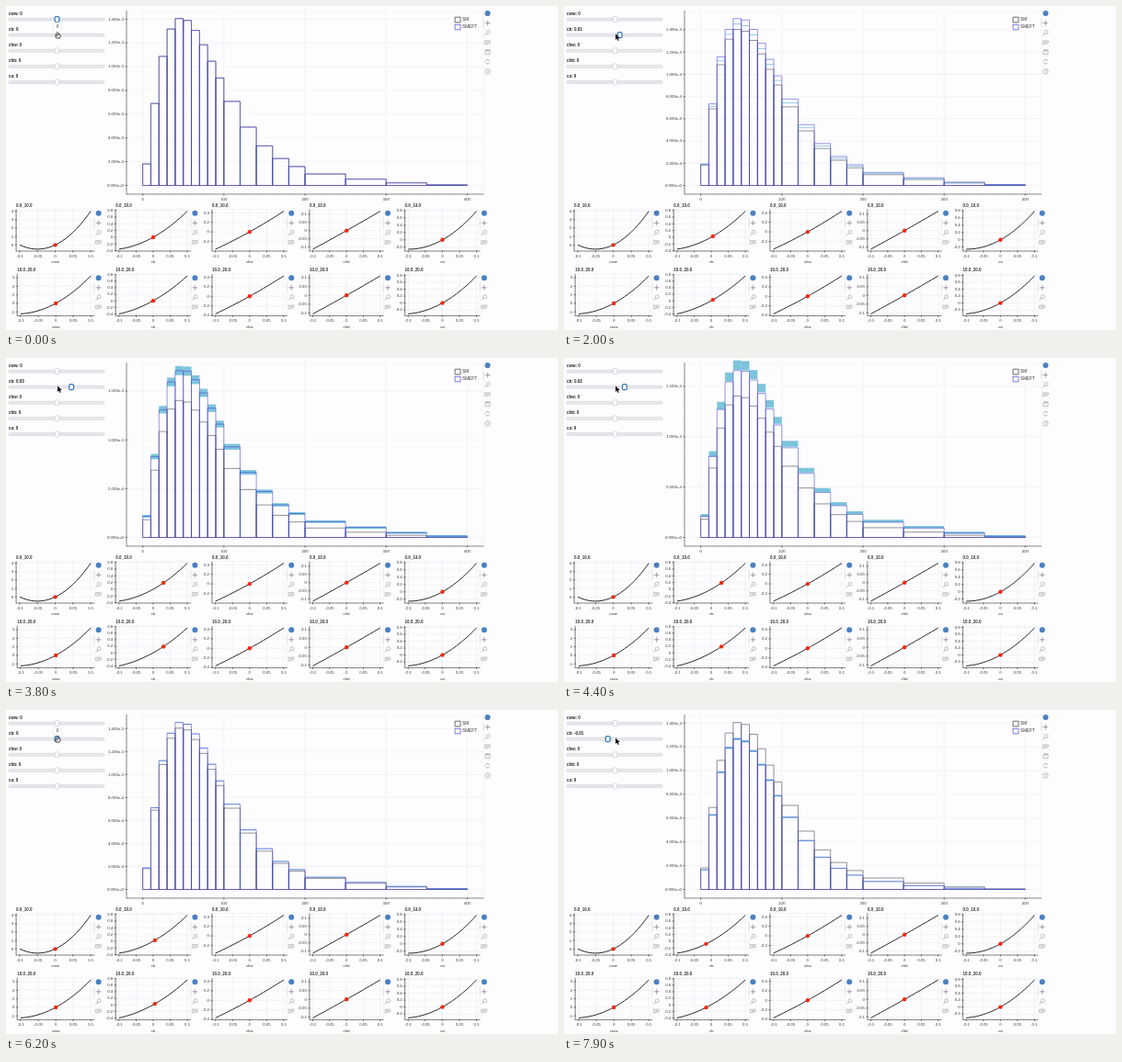
These frames come from a looping animation (600 by 353 pixels, 8000 ms). An HTML page with a canvas:

```html
<!DOCTYPE html>
<html>
<head>
<meta charset="utf-8">
<style>
html, body { margin: 0; width: 100%; height: 100%; overflow: hidden; background: #fdfcfe; }
canvas { display: block; width: 600px; height: 353px; }
</style>
</head>
<body>
<canvas id="stage"></canvas>
<script>
const stage = document.getElementById('stage');
const dpr = window.devicePixelRatio || 1;
stage.width = 600 * dpr;
stage.height = 353 * dpr;
const g = stage.getContext('2d');

const LOOP = 8000, BG = '#fdfcfe', GRID = '#ebeaf0', INK = '#333', BLUE = '#3f3fd0', ICON = '#a2a2a8';
const NAMES = ['cww', 'cb', 'chw', 'chb', 'ca'];

// the drag as [time, value] corners; the slider snaps to steps of 0.005
const DRAG = [[0, 0], [1000, 0], [1755, .0075], [2567, .02], [3600, .03], [4100, .03],
  [4500, .0175], [4850, .0125], [6150, .0025], [6550, 0], [7600, -.015], [LOOP, -.015]];

function valueAt(t) {
  if (t <= 0) return 0;
  const i = DRAG.findIndex(([at]) => at >= t);
  const [t0, v0] = DRAG[i - 1], [t1, v1] = DRAG[i];
  return Math.round((v0 + (v1 - v0) * (t - t0) / (t1 - t0)) / .005) * .005;
}

// bins widen from 10 to 20 to 50
const EDGES = [0];
while (EDGES.at(-1) < 400) {
  const x = EDGES.at(-1);
  EDGES.push(x + (x < 100 ? 10 : x < 200 ? 20 : 50));
}
const BINS = EDGES.slice(1).map((right, i) => ({ left: EDGES[i], right, x: (EDGES[i] + right) / 2 }));

// heights in 1e-3: a gamma-like peak with a small tail, and its growth with cb
const standard = x => 1.408 * ((x / 48) ** 1.5 * Math.exp((48 - x) / 32)
  + .03 * Math.exp(-(((x - 245) / 85) ** 2)));
const shifted = (x, c) => standard(x) * (1 + (.2 + .95e-5 * x * x) * (31 * c + 75 * c * c));

// linear and quadratic term of each coefficient, per bin
const ROWS = [
  { title: '0.0_10.0', top: 221.5, terms: [[20, 200], [5.65, 21], [3.95, 3.5], [1.16, .25], [5.2, 26.5]] },
  { title: '10.0_20.0', top: 292, terms: [[22.3, 99], [5.8, 18], [4, 3], [1.08, .25], [5.5, 23.5]] }
];

function text(s, x, y, { size = 4.3, align = 'left', style = '', color = INK } = {}) {
  g.font = `${style} ${size}px "Liberation Sans", Arial, sans-serif`;
  g.textAlign = align;
  g.textBaseline = 'middle';
  g.fillStyle = color;
  g.fillText(s, x, y);
}

function line(points, color = INK, width = .55) {
  g.beginPath();
  points.forEach(([x, y]) => g.lineTo(x, y));
  g.strokeStyle = color;
  g.lineWidth = width;
  g.stroke();
}

function box(x, y, w, h, stroke, fill, r = 0, width = .7) {
  g.beginPath();
  g.roundRect(x, y, w, h, r);
  if (fill) { g.fillStyle = fill; g.fill(); }
  if (stroke) { g.strokeStyle = stroke; g.lineWidth = width; g.stroke(); }
}

function dot(x, y, r, fill, stroke) {
  g.beginPath();
  g.arc(x, y, r, 0, 7);
  if (fill) { g.fillStyle = fill; g.fill(); }
  if (stroke) { g.strokeStyle = stroke; g.lineWidth = .7; g.stroke(); }
}

// an axis pads its data by 5% and picks the round step nearest to six intervals
function axis(lo, hi, from, to) {
  const pad = (hi - lo) / 20, start = lo - pad, span = hi - lo + 2 * pad;
  const at = v => from + (to - from) * (v - start) / span;
  const base = 10 ** Math.floor(Math.log10(span / 6));
  const miss = s => Math.abs(6 - span / s);
  const step = [1, 2, 5, 10].map(m => m * base).reduce((a, b) => miss(b) < miss(a) ? b : a);
  const every = s => {
    const list = [];
    for (let n = Math.ceil(start / s); n * s <= start + span; n++) list.push(+(n * s).toFixed(6));
    return list;
  };
  return { at, ticks: every(step), minor: every(step / 5) };
}

function frame(x, y, left, top, right, bottom, name) {
  x.minor.forEach(v => line([[x.at(v), bottom], [x.at(v), bottom + 1]], '#777', .35));
  y.minor.forEach(v => line([[left - 1, y.at(v)], [left, y.at(v)]], '#777', .35));
  box(left, top, right - left, bottom - top, GRID, null, 0, .5);
  x.ticks.forEach(v => {
    const p = x.at(v);
    line([[p, top], [p, bottom]], GRID);
    line([[p, bottom - .8], [p, bottom + 1.7]]);
    text(v, p, bottom + 5.4, { align: 'center' });
  });
  y.ticks.forEach(v => {
    const p = y.at(v);
    line([[left, p], [right, p]], GRID);
    line([[left - 1.7, p], [left + .8, p]]);
    text(name(v), left - 3, p + .2, { align: 'right' });
  });
  line([[left, top], [left, bottom], [right, bottom]]);
}

const icons = [
  (x, y) => dot(x, y, 3, '#4a7fc0'),
  (x, y) => {
    line([[x - 3, y], [x + 3, y]], ICON, .8);
    line([[x, y - 3], [x, y + 3]], ICON, .8);
    dot(x, y, 1.2, ICON);
  },
  (x, y) => {
    dot(x + .7, y - .7, 2, null, ICON);
    line([[x - .8, y + .8], [x - 3, y + 3]], ICON, .9);
  },
  (x, y) => {
    box(x - 3, y - 1.8, 2.6, 3.6, ICON);
    dot(x + 1.7, y - .7, 1.4, null, ICON);
    line([[x + 1.7, y + 1], [x + 1.7, y + 2.5]], ICON);
  },
  (x, y) => {
    box(x - 2.5, y - 2.5, 5, 5, ICON);
    line([[x - 1.3, y - 1.4], [x + 1.3, y - 1.4]], ICON, 1.2);
  },
  (x, y) => {
    g.beginPath();
    g.arc(x, y, 2.3, .4, 2.9);
    g.moveTo(x - 2.2, y - .6);
    g.arc(x, y, 2.3, 3.4, 6);
    g.strokeStyle = ICON;
    g.lineWidth = .8;
    g.stroke();
  },
  (x, y) => {
    dot(x, y, 2.7, null, ICON);
    text('?', x, y + .2, { size: 4, align: 'center', color: '#888' });
  }
];

function toolbar(x, y, count) {
  icons.slice(0, count).forEach((icon, i) => icon(x, y + i * 10.55));
  line([[x - 4.5, y + 6], [x - 4.5, y + 15]], '#d9cdbd');
}

function sliders(t, c) {
  NAMES.forEach((name, i) => {
    const y = 14.6 + i * 17.1, v = i === 1 ? c : 0;
    const shown = Math.trunc(v * 100 + Math.sign(v) * 1e-6) / 100;
    text(`${name}: ${shown}`, 3, y - 6, { size: 4.5, style: 'bold', color: '#222' });
    box(3, y - 1.4, 104, 2.8, '#cfced4', '#e9e8ed', 1.2, .6);
    const focus = i === (t < 100 ? 0 : 1);
    box(55.5 + v * 520 - 2.4, y - 3, 4.8, 6, focus ? '#3478bd' : '#c4c3ca', '#fff', 1.5, focus ? 1.3 : .7);
  });
}

function cursor(c) {
  if (c) { // arrow beside the handle
    g.beginPath();
    [[56, 30.5], [56, 37], [57.6, 35.6], [58.7, 38], [59.8, 37.5], [58.8, 35.2], [60.8, 35]].forEach(p => g.lineTo(...p));
    g.closePath();
    g.fillStyle = '#111';
    g.fill();
    return;
  }
  // hand on the handle, with its tooltip
  box(51.5, 18, 9, 9, '#e1e0e6', '#fff', 1, .5);
  text('0', 56, 22.7, { size: 4.5, align: 'center' });
  box(54, 30.5, 5, 4.5, '#222', '#fff', 1.6, .9);
  box(55, 28.7, 1.6, 4, '#222', '#fff', .8, .7);
}

function histogram(c, bandC) {
  const top = Math.max(...BINS.map(b => Math.max(standard(b.x), shifted(b.x, c))));
  const x = axis(0, 400, 131, 519), y = axis(0, top, 204.6, 4.6);
  frame(x, y, 131, 5, 519, 205, v => (v / 1000).toExponential(3));

  const bars = (height, color) => BINS.forEach(b => {
    const left = x.at(b.left), h = y.at(height(b.x)), floor = y.at(0);
    box(left, h, x.at(b.right) - left, floor - h, color, null, 0, .55);
  });
  bars(standard, '#3a3a48');
  if (bandC) BINS.forEach(b => {
    const left = x.at(b.left), h = y.at(shifted(b.x, bandC));
    const half = Math.max((1 + .022 * (y.at(0) - h)) * (bandC / .03) ** 2, .4);
    box(left, h - half, x.at(b.right) - left, 2 * half, null, '#7cc4dc');
  });
  bars(v => shifted(v, c), BLUE);

  box(485, 9, 32, 20, null, BG);
  [['SM', 12.2, INK], ['SMEFT', 20.2, BLUE]].forEach(([label, top, color]) => {
    box(488, top, 6, 5.6, color);
    text(label, 496, top + 3, { size: 4.7 });
  });
  toolbar(523.5, 8, 7);
}

function smallPlot({ title, top, terms }, col, c) {
  const [a, b] = terms[col], curve = v => a * v + b * v * v;
  const xs = Array.from({ length: 21 }, (_, i) => (i - 10) / 100), ys = xs.map(curve);
  const bottom = top + 45.5, right = 96 + col * 104.8;
  const y = axis(Math.min(...ys), Math.max(...ys), bottom, top);
  // longer tick labels leave less room
  const left = right - 86 + 1.1 * Math.max(...y.ticks.map(v => `${v}`.length));
  const x = axis(-.1, .1, left, right);

  frame(x, y, left, top, right, bottom, v => v);
  text(title, left, top - 4.2, { size: 4.5, style: 'bold' });
  text(NAMES[col], (left + right) / 2, bottom + 11.8, { size: 4.4, align: 'center', style: 'italic' });
  line(xs.map((v, i) => [x.at(v), y.at(ys[i])]), '#111', .9);
  const v = col === 1 ? c : 0;
  dot(x.at(v), y.at(curve(v)), 2.2, '#f02a12');
  toolbar(right + 4.6, top + 4.3, 4);
}

function draw(t) {
  g.setTransform(dpr, 0, 0, dpr, 0, 0);
  g.fillStyle = BG;
  g.fillRect(0, 0, 600, 353);
  // bars, band and dots each follow the slider a little later
  const c = valueAt(t);
  histogram(valueAt(t - 100), valueAt(t - 250));
  ROWS.forEach(row => NAMES.forEach((_, col) => smallPlot(row, col, valueAt(t - 350))));
  sliders(t, c);
  cursor(c);
}

const start = performance.now();
function tick() {
  draw((performance.now() - start) % LOOP);
  requestAnimationFrame(tick);
}
tick();
</script>
</body>
</html>
```
